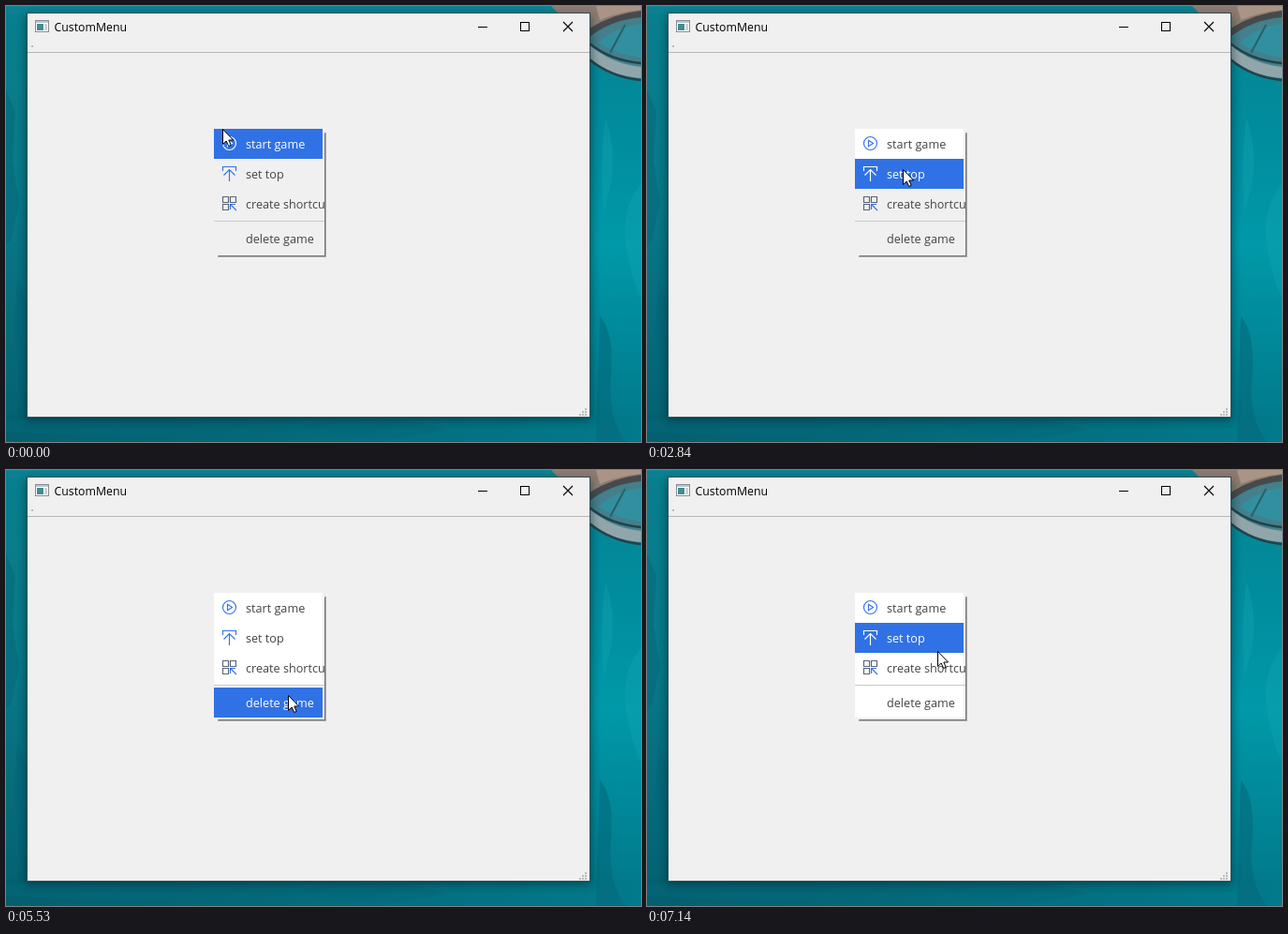
An HTML page that plays this animation: 678 by 465 pixels, repeating every 8000 ms.

```html
<!DOCTYPE html>
<html lang="en">
<head>
<meta charset="utf-8">
<title>CustomMenu</title>
<style>
  html, body { margin: 0; width: 100%; height: 100%; overflow: hidden; background: #057787; }
  svg { display: block; width: 678px; height: 465px; }
  text { font: 12.65px "Open Sans", "Noto Sans", sans-serif; }
  .title { font-size: 12.3px; fill: #000; }
  .item rect.bar { fill: none; }
  .item text { fill: #444; }
  .item .icon { fill: none; stroke: #3573e8; stroke-width: 1.15; }
  .item .icon .dim { stroke: #5a6478; }
  .item.on rect.bar { fill: #3072e5; }
  .item.on text { fill: #fff; }
  .item.on .icon, .item.on .icon .dim { stroke: #fff; }
</style>
</head>
<body>
<svg viewBox="0 0 678 465">
  <defs>
    <linearGradient id="left" x2="0" y2="1">
      <stop offset="0" stop-color="#087f8e"/>
      <stop offset=".45" stop-color="#087988"/>
      <stop offset="1" stop-color="#045f6f"/>
    </linearGradient>
    <linearGradient id="right" x2="0" y2="1">
      <stop offset="0" stop-color="#078292"/>
      <stop offset=".3" stop-color="#008d9e"/>
      <stop offset=".55" stop-color="#0099a9"/>
      <stop offset="1" stop-color="#017688"/>
    </linearGradient>
    <linearGradient id="bottom">
      <stop offset="0" stop-color="#045f6f"/>
      <stop offset=".5" stop-color="#056b7b"/>
      <stop offset="1" stop-color="#027a8b"/>
    </linearGradient>
    <filter id="soft" x="-10%" y="-10%" width="120%" height="120%">
      <feGaussianBlur stdDeviation="5"/>
    </filter>
    <clipPath id="menuClip"><rect x="222" y="131" width="118" height="136"/></clipPath>
  </defs>

  <!-- water and shore -->
  <rect width="330" height="465" fill="url(#left)"/>
  <rect x="330" width="348" height="465" fill="url(#right)"/>
  <rect y="436" width="678" height="29" fill="url(#bottom)"/>
  <rect width="580" height="9" fill="#0a8090"/>
  <g fill="#04687a" opacity=".55">
    <path d="M0 90L10 112L7 165L14 210L5 250L0 255Z"/>
    <path d="M12 290L22 318V410L14 396L8 350Z"/>
    <path d="M0 442Q90 436 170 447T330 445T470 452L420 460Q250 452 130 460L0 454Z"/>
    <path d="M634 330Q650 350 646 395T662 465H630Z"/>
  </g>
  <g fill="#12a3b2" opacity=".4">
    <path d="M678 190Q656 215 662 255T678 310Z"/>
    <path d="M640 120Q652 150 646 190L638 220Q634 160 640 120Z"/>
  </g>
  <path d="M582 0H678V36L650 28L623 40V8H590Z" fill="#8c7b70"/>
  <path d="M623 24Q648 8 678 5V14Q648 17 623 36Z" fill="#474a4c"/>
  <path d="M630 0H678V4Q652 7 634 15Z" fill="#aa9485"/>
  <path d="M623 33Q646 15 678 12V77Q646 75 623 56Z" fill="#43808b"/>
  <path d="M633 39Q650 23 678 19V55Q653 52 633 39Z" fill="#328fa0"/>
  <path d="M623 41Q644 61 678 65V77Q645 74 623 58Z" fill="#91a6aa"/>
  <path d="M623 40Q645 58 678 61M623 57Q646 76 678 79" fill="none" stroke="#23434b" stroke-width="2.5"/>
  <path d="M645 50L661 20" stroke="#28606a" stroke-width="2"/>

  <!-- window -->
  <rect x="21" y="11" width="604" height="431" fill="#00202a" opacity=".55" filter="url(#soft)"/>
  <rect x="22" y="7" width="602" height="432" fill="#2e5058"/>
  <rect x="23" y="8" width="600" height="430" fill="#f0f0f0"/>
  <rect x="23" y="49" width="600" height="1" fill="#b6b6b6"/>
  <rect x="27" y="42" width="2" height="2" fill="#b8b8b8"/>
  <g>
    <rect x="31.5" y="15.5" width="14" height="12" fill="#fff" stroke="#858d93"/>
    <rect x="32" y="16" width="13" height="2" fill="#b8c6cd"/>
    <rect x="33" y="19" width="7" height="7" fill="#438c94"/>
    <rect x="41" y="19" width="3" height="7" fill="#cbd3d6"/>
  </g>
  <text class="title" x="51.5" y="27">CustomMenu</text>
  <g fill="none" stroke="#000">
    <path d="M504 22.5H514"/>
    <rect x="549.5" y="17.5" width="9" height="9"/>
    <path d="M595 17L605 27M605 17L595 27" stroke-width="1.1"/>
  </g>
  <path d="M618 429h2v2h-2zM615 432h2v2h-2zM618 432h2v2h-2zM612 435h2v2h-2zM615 435h2v2h-2zM618 435h2v2h-2z" fill="#bababa"/>

  <!-- menu -->
  <path d="M340 135H342V268H226V266H340Z" fill="#a8a8a8"/>
  <path d="M340 136H341V267H227V266H340Z" fill="#777"/>
  <rect x="222" y="131" width="118" height="135" fill="#f0f0f0"/>
  <rect id="white" x="222" y="131" width="116" height="0" fill="#fff"/>
  <rect x="222" y="229" width="118" height="1" fill="#c9c9c9"/>
  <g id="menu" clip-path="url(#menuClip)">
    <g class="item">
      <rect class="bar" x="222" y="131" width="116" height="32"/>
      <g class="icon"><circle cx="238.5" cy="146.5" r="7"/><path d="M236.5 143.2L241.5 146.5L236.5 149.8Z"/></g>
      <text x="256" y="152">start game</text>
    </g>
    <g class="item">
      <rect class="bar" x="222" y="163" width="116" height="32"/>
      <g class="icon"><path d="M231.5 176V171.5H245.5V176"/><path d="M238.5 187V174.5M232.5 180.5L238.5 174.5L244.5 180.5"/></g>
      <text x="256" y="184">set top</text>
    </g>
    <g class="item">
      <rect class="bar" x="222" y="195" width="116" height="32"/>
      <g class="icon">
        <path class="dim" d="M231.5 203.5h6v6h-6zM239.5 203.5h6v6h-6zM231.5 211.5h6v6h-6z"/>
        <path d="M239.5 217V211.5H245M239.5 211.5L246 218"/>
      </g>
      <text x="256" y="216">create shortcut</text>
    </g>
    <g class="item">
      <rect class="bar" x="222" y="232" width="116" height="32"/>
      <text x="256" y="253">delete game</text>
    </g>
  </g>

  <!-- pointer -->
  <g id="busy" fill="none" stroke-width="3">
    <circle cx="324.5" cy="193.5" r="6.5" stroke="#2a9fe0"/>
    <path d="M324.5 187A6.5 6.5 0 0 1 331 193.5" stroke="#8fe0fa"/>
  </g>
  <path id="pointer" d="M.5 .5V16.5L4.2 13L6.7 18.5L9.2 17.4L6.8 12H11.6Z" fill="#fff" stroke="#000"/>
</svg>
<script>
  const LOOP = 8000, HOME = [231, 131];
  // first step, last step, step count, end x, end y
  const MOVES = [
    [30, 230, 8, 256, 141],
    [1440, 1880, 15, 272, 172],
    [2840, 3260, 16, 289, 211],
    [4160, 4550, 13, 298, 227],
    [4581, 4750, 7, 300, 240],
    [5530, 5530, 1, 301, 240],
    [5840, 5960, 5, 303, 223],
    [5990, 6050, 3, 304, 219],
    [6330, 6650, 11, 310, 193]
  ];
  const TOPS = [131, 163, 195, 232], ROW = 32;
  const $ = id => document.getElementById(id);
  const pointer = $("pointer"), white = $("white"), busy = $("busy");
  const items = [...document.querySelectorAll(".item")];

  function position(t) {
    let [x, y] = HOME;
    for (const [start, end, n, toX, toY] of MOVES) {
      if (t < start) break;
      const gap = (end - start) / (n - 1) || 1;
      const part = Math.min(n, Math.floor((t - start) / gap + 1e-6) + 1) / n;
      x += (toX - x) * part;
      y += (toY - y) * part;
    }
    return [Math.round(x), Math.round(y)];
  }

  // The white backing is revealed as the pointer first travels down.
  function whiteEnd(t, y) {
    if (t >= 4750 || y >= 232) return 264;
    if (y >= 227) return y + 19;
    return y >= 195 ? 227 : y >= 163 ? 195 : 131;
  }

  function draw(t) {
    const [x, y] = position(t);
    pointer.setAttribute("transform", `translate(${x} ${y})`);
    white.setAttribute("height", whiteEnd(t, y) - 131);
    items.forEach((el, i) => el.classList.toggle("on", y >= TOPS[i] && y < TOPS[i] + ROW));
    busy.style.display = t >= 7110 && t < 7140 ? "" : "none";
  }

  const began = performance.now();
  function tick() {
    draw((performance.now() - began) % LOOP);
    requestAnimationFrame(tick);
  }
  tick();
</script>
</body>
</html>
```
